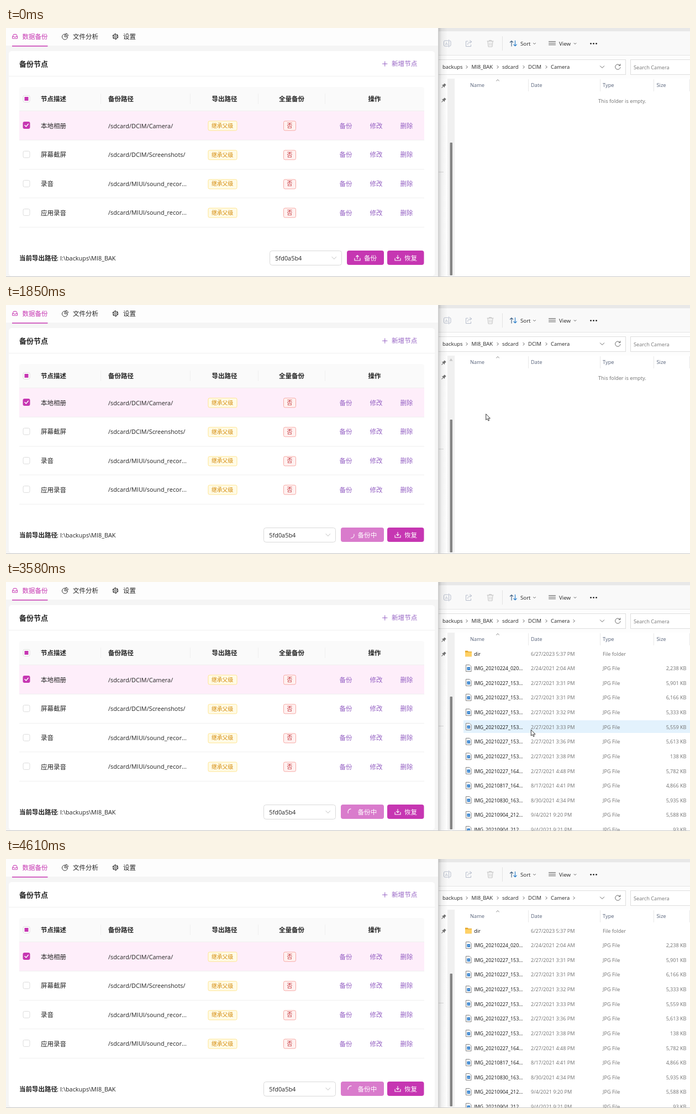
Write an HTML page that moves like this. It is 1238x452 px and loops after 4.68 s.

```html
<!DOCTYPE html>
<html lang="zh">
<head>
<meta charset="utf-8">
<title>Backup</title>
<style>
html, body { margin: 0; width: 100%; height: 100%; overflow: hidden; background: #fff; }
svg { display: block; width: 1238px; height: 452px; }
text { font-family: "Open Sans", "Noto Sans CJK SC", "Noto Sans CJK", sans-serif; white-space: pre; }
.cjk { font-family: "Noto Sans CJK SC", "Noto Sans CJK", sans-serif; }
.line { fill: none; stroke-linecap: round; stroke-linejoin: round; }
</style>
</head>
<body>
<svg id="stage" viewBox="0 0 1238 452" xmlns="http://www.w3.org/2000/svg">
  <defs>
    <linearGradient id="shade">
      <stop offset="0" stop-color="#000" stop-opacity=".18"/>
      <stop offset=".35" stop-color="#000" stop-opacity=".06"/>
      <stop offset="1" stop-color="#000" stop-opacity="0"/>
    </linearGradient>
  </defs>
  <g id="explorer"></g>
  <g id="files"></g>
  <g id="app"></g>
  <g id="select"></g>
  <g id="backup">
    <rect id="backupBox" y="404" height="26" rx="4" fill="#c636b2"/>
    <path id="upload" class="line" stroke="#fff" stroke-width="1.1" d="M631 418v4h10v-4M636 419v-6M633.7 415l2.3-2.3 2.3 2.3"/>
    <path id="spinner" class="line" stroke="#fff" stroke-width="1.1" d="M-1.5-5.4A5.6 5.6 0 0 1 5.6 0"/>
    <text id="backupText" class="cjk" y="422.2" font-size="11.6" fill="#fff"></text>
  </g>
  <g id="pointer">
    <path id="arrow" fill="#fff" stroke="#222" stroke-width=".9" stroke-linejoin="round" d="M0 0V10.8L2.5 8.6 4.2 12.4 5.9 11.6 4.3 8H7.6Z"/>
    <path id="hand" fill="#fff" stroke="#222" stroke-width=".9" stroke-linejoin="round" d="M-1 8V.8Q0-.8 1.2.8V5Q2.4 4 3.4 5.2 4.6 4.4 5.4 5.7 6.9 5.1 7.3 6.7V9.8Q7.2 12 6 13.6H.6Q-.8 11.6-3.3 8.5-3.4 6.8-1 8Z"/>
  </g>
</svg>
<script>
const LOOP = 4680, TICK = 68.9;
const PINK = '#c636b2', VIOLET = '#9460c3', INK = '#242424', GRAY = '#717171';
const $ = id => document.getElementById(id);
const rect = (x, y, w, h, fill, more = '') =>
  `<rect x="${x}" y="${y}" width="${w}" height="${h}" fill="${fill}" ${more}/>`;
const box = (x, y, w, h, fill, stroke, r) =>
  rect(x + .5, y + .5, w - 1, h - 1, fill, `stroke="${stroke}" rx="${r}"`);
const line = (d, stroke, width = 1, more = '') =>
  `<path class="line" d="${d}" stroke="${stroke}" stroke-width="${width}" ${more}/>`;
const text = (x, y, s, size, fill = INK, more = '') =>
  `<text x="${x}" y="${y}" font-size="${size}" fill="${fill}" ${more}>${s}</text>`;
const cjk = (x, y, s, size = 11.5, fill = INK, more = '') =>
  text(x, y, s, size, fill, 'class="cjk" ' + more);
const bold = 'font-weight="700"';

function drawExplorer() {
  const chevron = (x, y, r = 2) => line(`M${x - r} ${y - r / 2}l${r} ${r} ${r} ${-r}`, '#555', .9);
  const crumb = x => line(`M${x - 1} 68.5l2.3 2.3-2.3 2.3`, '#444', .9);
  const pin = y => `<path transform="translate(792 ${y}) rotate(45)" fill="#777" d="M-2-4.5H2V-1L3.5 1H.5V5H-.5V1H-3.5L-2-1Z"/>`;
  const pale = '#b5bccb';
  let s = rect(783, 0, 455, 452, '#fff') + rect(783, 0, 455, 6, '#e8e8e8') + rect(783, 6, 455, 43, '#f9f9f9')
    + rect(783, 49, 455, 1, '#e6e6e6') + rect(783, 50, 455, 42, '#fdfdfd');
  s += line('M800 23h-5.500q-2 0-2 2v6q0 2 2 2h5.500M803 23q2 0 2 2v6q0 2-2 2M801.500 21.500v13', pale)
    + text(794.8, 31, 'A', 8, pale);
  s += line('M836 24h-3.500v9.500h9v-3M835.500 30q1-5 6-5M839.500 22.500l3.500 2.500-3.500 2.500', pale);
  s += line('M871 24h11M874.500 24v-1.500h4V24M872 24l1 10h7l1-10M875 27v4.500M878 27v4.500', '#c2c2c2');
  s += rect(898, 15, 1, 26, '#e4e4e4');
  s += line('M915 33V23.500M912.300 26l2.700-2.700 2.700 2.700', '#3f5f80', 1.1) + line('M921.500 23v9.500M918.800 30l2.700 2.700 2.700-2.700', '#1f78c8', 1.1);
  s += text(931, 31.5, 'Sort', 9.7) + chevron(956.5, 28.3) + text(1001, 31.5, 'View', 9.8) + chevron(1030, 28.3);
  s += line('M982.500 24.500h12M982.500 27.500h12M982.500 30.500h12', '#555');
  for (const x of [1058.5, 1063.5, 1068.5]) s += `<circle cx="${x}" cy="28.300" r="1.400" fill="#222"/>`;
  s += box(770, 57, 352, 28, '#fff', '#dedede', 0) + box(1130, 57, 120, 28, '#fff', '#dedede', 0);
  [[790, 'backups'], [842.5, 'MI8_BAK'], [898, 'sdcard'], [945, 'DCIM'], [986, 'Camera']]
    .forEach(([x, name]) => s += text(x, 74.3, name, 9.45));
  s += [834, 890, 937, 978].map(crumb).join('') + `<g id="lastCrumb">${crumb(1028)}</g>`;
  s += chevron(1079, 70.7, 3.6) + line('M1111.300 68A4.700 4.700 0 1 0 1112 71.500M1111.800 65.500v2.800h-2.800', '#555', .9);
  s += text(1136, 74.6, 'Search Camera', 9.2, '#757575');
  s += rect(799, 92, 13, 358, '#f0f0f0') + rect(803.5, 208, 4.5, 241, '#858585', 'rx="1"');
  s += '<path id="scrollUp" d="M802.500 101.500l3-4.500 3 4.500z" fill="#c4c4c4"/>';
  s += pin(105) + pin(131) + rect(783, 261, 9, 1, '#dcdcdc');
  s += line('M887.500 96l2.500-2.300 2.500 2.300', '#777', .9);
  [[840, 'Name'], [950, 'Date'], [1080, 'Type'], [1177.5, 'Size']]
    .forEach(([x, name]) => s += text(x, 106.5, name, 9.3, '#56627a'));
  for (const x of [945, 1075, 1172, 1237]) s += rect(x, 93, 1, 22, '#e8e8e8');
  s += text(1072, 135.8, 'This folder is empty.', 9.25, GRAY, 'id="empty"');
  $('explorer').innerHTML = s;
}

const FILES = [
  'dir|6/27/2023 5:37 PM|',
  '0224_020|2/24/2021 2:04 AM|2,238',
  '0227_153|2/27/2021 3:31 PM|5,901',
  '0227_153|2/27/2021 3:31 PM|6,166',
  '0227_153|2/27/2021 3:32 PM|5,333',
  '0227_153|2/27/2021 3:33 PM|5,559',
  '0227_153|2/27/2021 3:36 PM|5,613',
  '0227_153|2/27/2021 3:38 PM|138',
  '0227_164|2/27/2021 4:48 PM|5,782',
  '0817_164|8/17/2021 4:41 PM|4,866',
  '0830_163|8/30/2021 4:34 PM|5,935',
  '0904_212|9/4/2021 9:20 PM|5,588',
  '0904_212|9/4/2021 9:21 PM|93'
];
const rowY = i => 130.2 + i * 26.62;

function drawFiles() {
  $('files').innerHTML = FILES.map((entry, i) => {
    const [name, date, size] = entry.split('|'), y = rowY(i), top = Math.round(y) - 6.5;
    const icon = i
      ? `<path d="M832.500 ${top}h6.500l3 3v9h-9.500z" fill="#fff" stroke="#757575" stroke-width=".9"/>`
        + rect(834.5, top + 4, 5.5, 5.5, '#2779c9') + line(`M835.800 ${top + 8}l1.800-1.800 1.200 1.200`, '#fff', .8)
      : `<path d="M831 ${y - 5.5}h4.500l1.500 1.500h6v9h-12z" fill="#e5a82c"/>` + rect(831, y - 2.8, 12, 7.8, '#ffd166', 'rx=".8"');
    const label = i ? `IMG_2021${name}...` : name;
    return `<g>${rect(828, Math.round(y) - 12, 410, 23, '#e3f2fd', 'class="glow"')}${icon}`
      + text(847, y + 3.4, label, i ? 8.95 : 9.3, '#111')
      + text(950, y + 3.4, date, 9.1, GRAY)
      + text(1080, y + 3.4, i ? 'JPG File' : 'File folder', 9.1, GRAY)
      + (i ? text(1231.5, y + 3.4, size + ' KB', 9.1, GRAY, 'text-anchor="end"') : '') + '</g>';
  }).join('');
}

function drawApp() {
  const paths = ['DCIM/Camera/', 'DCIM/Screenshots/', 'MIUI/sound_recor...', 'MIUI/sound_recor...'];
  let s = rect(783, 0, 16, 452, 'url(#shade)') + rect(0, 0, 783, 452, '#f5f5f5') + rect(0, 0, 783, 32, '#fdfdfd')
    + rect(5, 42, 771, 408, '#fff', 'rx="5"') + rect(0, 451, 1238, 1, '#c9c9c9') + rect(782, 0, 1, 452, '#d0d0d0');
  s += line('M12 15.500l1.800-4h4.900l1.800 4v3.500h-8.500zM12 15.500h2.700l.7 1.300h1.700l.7-1.300h2.700', PINK);
  s += cjk(29.5, 19.5, '数据备份', 11.5, PINK) + rect(11, 32, 64.5, 1.5, PINK);
  s += line('M106.500 11a5 5 0 1 0 5 5h-5zM108.500 10v4h4a4 4 0 0 0-4-4', '#333') + cjk(121, 19.5, '文件分析');
  s += `<circle cx="198" cy="15.500" r="4.500" fill="none" stroke="#333" stroke-width="1.600" stroke-dasharray="3 1.712"/>`
    + `<circle cx="198" cy="15.500" r="3.900" fill="none" stroke="#333" stroke-width=".9"/>`
    + `<circle cx="198" cy="15.500" r="1.700" fill="none" stroke="#333"/>` + cjk(212, 19.5, '设置');
  s += cjk(24, 70, '备份节点', 13, INK, bold) + line('M681.500 65h8.500M685.750 60.800v8.500', VIOLET) + cjk(698, 69.3, '新增节点', 11.6, VIOLET);
  s += rect(5, 87, 771, 1, '#f0f0f0');
  s += '<path d="M24 151V112q0-5 5-5H752q5 0 5 5v39z" fill="#fafafa"/>' + rect(24, 150, 733, 1, '#f0f0f0');
  s += box(30.5, 122, 13, 13, '#fff', '#dcdcdc', 2.5) + rect(33.5, 125, 7, 7, PINK);
  [[63, '节点描述'], [185, '备份路径'], [372.5, '导出路径'], [494, '全量备份'], [655.5, '操作']]
    .forEach(([x, name]) => s += cjk(x, 133.3, name, 11.5, INK, bold));
  for (const x of [171, 333, 456, 577]) s += rect(x, 119, 1, 19, '#efefef');
  ['本地相册', '屏幕截屏', '录音', '应用录音'].forEach((name, i) => {
    const y = 177.3 + i * 52.6, base = y + 4.4, mid = Math.round(y);
    s += i ? box(30.5, mid - 7, 13, 13, '#fff', '#dcdcdc', 2.5)
      : rect(24, 151, 733, 52, '#feeefa', 'id="row"') + rect(30.5, 170, 13, 13, PINK, 'rx="3"') + line('M34 176.500l2.300 2.400 4-4.700', '#fff', 1.5);
    s += rect(24, Math.round(y + 25.7), 733, 1, '#f0f0f0');
    s += cjk(63, base, name) + text(185, y + 4.2, '/sdcard/' + paths[i], 10.9);
    s += box(365.5, mid - 8.5, 53, 18, '#fffbe6', '#ffe58f', 2.5) + cjk(372, y + 3.9, '继承父级', 9.8, '#d48806');
    s += box(502, mid - 8.5, 23, 18, '#fff1f0', '#f7a9a5', 2.5) + cjk(508.6, y + 3.9, '否', 9.8, '#c0282f');
    s += cjk(603.5, base, '备份', 11.5, VIOLET, i ? '' : 'id="link"') + cjk(658.5, base, '修改', 11.5, VIOLET) + cjk(713.5, base, '删除', 11.5, VIOLET);
  });
  s += cjk(24, 422.2, '当前导出路径', 11.5, INK, bold) + text(92, 422, ':', 11) + text(98, 422, 'I:\\backups\\MI8_BAK', 10.9);
  s += rect(690, 404, 66.5, 26, PINK, 'rx="4"') + line('M704 418v4h10v-4M709 412.500v6M706.700 416.300l2.300 2.300 2.300-2.300', '#fff', 1.1)
    + cjk(721, 422.2, '恢复', 11.6, '#fff');
  $('app').innerHTML = s;
  $('select').innerHTML = box(477, 404, 131, 27, '#fff', '#d9d9d9', 4) + text(487.3, 422, '5fd0a5b4', 10.9)
    + line('M590 415.500l3.800 4 3.800-4', '#bfbfbf');
}

const clamp = v => Math.min(1, Math.max(0, v));
const show = (el, on) => el.setAttribute('visibility', on ? 'inherit' : 'hidden');

// time, x, y; straight runs between stops
const PATH = [
  [195, 888, 404], [640, 610.5, 175.5], [1845, 610.5, 175.5], [1846, 868.7, 197.8],
  [3505, 868.7, 197.8], [3713, 1107.5, 404], [3850, 1177, 428], [4050, 1177, 428], [4200, 1190, 456]
];
function pointerAt(t) {
  const i = PATH.findIndex(p => p[0] > t);
  if (i < 1) return null;
  const [a, b] = [PATH[i - 1], PATH[i]], k = (t - a[0]) / (b[0] - a[0]);
  return [a[1] + (b[1] - a[1]) * k, a[2] + (b[2] - a[2]) * k];
}

// start time and spinner angle at that time
const SPINS = [[1164, 45], [1850, 90], [2395, 200]];

function fileCount(t) {
  if (t < 1980) return 0;
  return t < 3075 ? Math.min(12, 2 + Math.floor((t - 1980) / 46)) : 13;
}

function render(now) {
  const raw = now % LOOP;
  const t = raw < 200 ? 0 : 200 + Math.floor((raw - 195) / TICK) * TICK;
  const pos = pointerAt(t), onLink = t > 630 && t < 1845;

  show($('pointer'), pos);
  if (pos) $('pointer').setAttribute('transform', `translate(${pos})`);
  show($('hand'), pos && onLink);
  show($('arrow'), pos && !onLink);
  $('row').setAttribute('fill', t > 580 && t < 1845 ? '#f5e4f1' : '#feeefa');
  $('link').setAttribute('fill', onLink ? '#7fb2ec' : VIOLET);

  const count = fileCount(t);
  show($('empty'), !count);
  show($('lastCrumb'), count);
  show($('scrollUp'), t > 1845 && t < 2050);
  [...$('files').children].forEach((row, i) => {
    const hovered = pos && pos[0] > 900 && Math.abs(pos[1] - rowY(i)) < 13.3;
    show(row, i < count);
    show(row.firstChild, i < count && hovered);
  });

  const loading = t > 1030, grow = clamp((t - 1030) / 130), left = 617 - 11 * grow;
  $('select').setAttribute('transform', `translate(${-11 * grow})`);
  $('backup').setAttribute('opacity', 1 - .35 * clamp((t - 1095) / 138));
  $('backupBox').setAttribute('x', left);
  $('backupBox').setAttribute('width', 684 - left);
  $('backupText').textContent = loading ? '备份中' : '备份';
  $('backupText').setAttribute('x', loading ? left + 30.5 : 648);
  show($('upload'), !loading);
  const spin = SPINS.filter(s => s[0] <= t + 2).pop();
  show($('spinner'), spin);
  if (spin) $('spinner').setAttribute('transform', `translate(624.5 417.5) rotate(${spin[1] + (t - spin[0]) * .36})`);
}

drawExplorer();
drawFiles();
drawApp();
const start = performance.now();
(function loop() {
  render(performance.now() - start);
  requestAnimationFrame(loop);
})();
</script>
</body>
</html>
```
